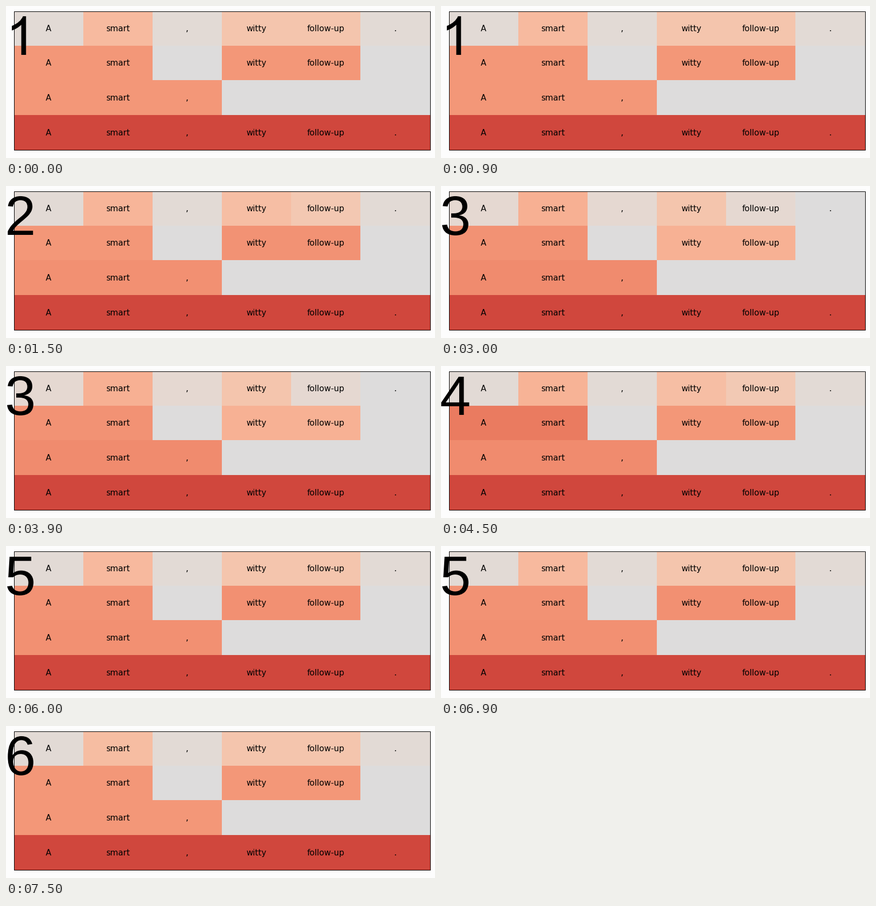
Animation, 799 px wide and 283 px high, one loop 8 s. Source, as a matplotlib script:

```python
import math

import matplotlib.pyplot as plt
from matplotlib.animation import FuncAnimation
from matplotlib.patches import PathPatch, Rectangle
from matplotlib.path import Path
from matplotlib.textpath import TextPath

W, H, DPI = 799, 283, 100
STEPS, HOLD = 6, 3
BASELINE = H - 91
XS = [int(15 + 775 / 6 * k) for k in range(7)]
YS = [round(9.5 + 64.5 * k) for k in range(5)]
WORDS = ["A", "smart", ",", "witty", "follow-up", "."]
SHOWN = [range(6), (0, 1, 3, 4), range(3), range(6)]
CMAP = plt.get_cmap("coolwarm")
NEUTRAL, BASE, FULL = 0.5, 0.757, 0.92


def bump(n, center, width):
    return math.exp(-((n - center) / width) ** 2)


def grid(n):
    """Scores of all cells at step n, row by row."""
    minor = 0.522 + 0.012 * bump(n, 2, 0.5)
    stop = 0.522 - 0.022 * bump(n, 2, 0.5)
    smart = 0.645 + 0.045 * bump(n, 2.2, 1.9)
    witty = 0.622 + 0.023 * (bump(n, 1, 0.4) + bump(n, 3, 0.4))
    follow = 0.622 - 0.09 * bump(n, 2.05, 0.7)

    clause = BASE + 0.026 * math.sin(math.pi * n / (STEPS - 1))
    left = BASE + 0.063 * bump(n, 3, 0.75)
    right = clause - 0.107 * bump(n, 2.2, 0.66)
    return [
        minor, smart, minor, witty, follow, stop,
        left, left, NEUTRAL, right, right, NEUTRAL,
        *[clause] * 3, *[NEUTRAL] * 3,
        *[FULL] * 6,
    ]


def one_path():
    """A '1' without a foot: a stem with a curved flag."""
    pts = [(37.3, 0), (28.5, 0), (28.5, 56), (20.5, 48.5), (10.9, 45.4),
           (10.9, 53.9), (27, 60.5), (31.6, 71.9), (37.3, 71.9), (37.3, 0)]
    M, L, Q, Z = Path.MOVETO, Path.LINETO, Path.CURVE3, Path.CLOSEPOLY
    codes = [M, L, L, Q, Q, L, Q, Q, L, Z]
    return Path([(x, BASELINE + y) for x, y in pts], codes)


def digit_path(n):
    if n == 1:
        return one_path()
    return TextPath((-1.9, BASELINE), str(n), size=103.2,
                    prop={"family": "Liberation Sans"})


fig = plt.figure(figsize=(W / DPI, H / DPI), dpi=DPI, facecolor="#fdfdfd")
ax = fig.add_axes([0, 0, 1, 1])
ax.set(xlim=(0, W), ylim=(0, H))
ax.axis("off")

cells = []
for top, bottom in zip(YS, YS[1:]):
    for left, right in zip(XS, XS[1:]):
        cell = Rectangle((left, H - bottom), right - left, bottom - top, lw=0)
        cells.append(ax.add_patch(cell))

ax.add_patch(Rectangle((15.5, H - 268.5), 775, 258, fill=False, ec="black",
                       lw=72 / DPI, snap=False, zorder=2))

for row, cols in enumerate(SHOWN):
    for col in cols:
        ax.text(79.42 + 129.01 * col, H - 42.25 - 64.625 * row, WORDS[col],
                size=11, family="DejaVu Sans", color="black",
                ha="center", va="center", zorder=3)

digits = [ax.add_patch(PathPatch(digit_path(n), fc="black", lw=0, zorder=4))
          for n in range(1, STEPS + 1)]


def update(i):
    step = i // HOLD
    for cell, score in zip(cells, grid(step)):
        cell.set_facecolor(CMAP(score))
    for n, digit in enumerate(digits):
        digit.set_visible(n == step)
    return cells + digits


anim = FuncAnimation(fig, update, frames=16, interval=500,
                     init_func=lambda: update(0), repeat=True)
plt.show()
```
